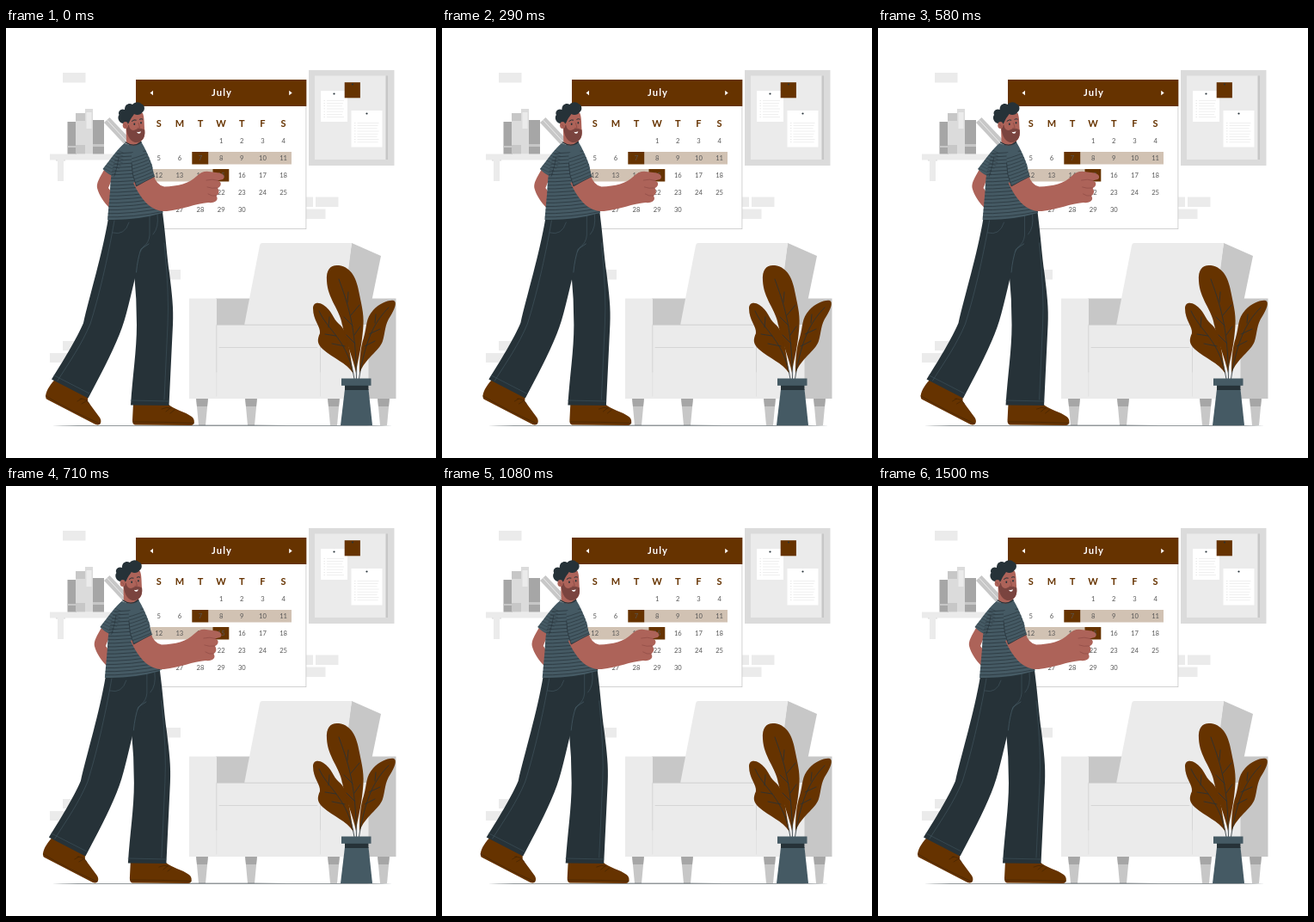
An HTML page with a canvas that plays this animation: 500 px wide and 500 px high, repeating every 1.54 s.

```html
<!DOCTYPE html>
<html lang="en">
<head>
<meta charset="utf-8">
<title>Planning the month</title>
<style>
  html, body { margin: 0; width: 100%; height: 100%; overflow: hidden; background: #fff; }
  canvas { display: block; width: 500px; height: 500px; }
</style>
</head>
<body>
<canvas id="stage" width="500" height="500"></canvas>
<script>
const ctx = document.getElementById('stage').getContext('2d');

const BROWN = '#663300', DEEP_BROWN = '#3f2305', TAN = '#d1c2b3';
const DARK = '#263238', SLATE = '#455a64';
const SKIN = '#ad6359', SKIN_SHADE = '#8f4b45', BEARD = '#7a443f';
const PALE = '#ebebeb', LIGHT = '#dbdbdb', MID = '#c7c7c7', GREY = '#a6a6a6';

const LOOP = 1540, FPS = 24, CYCLE = 1500, LEAD = 29;
const SHAKE = [0, -1, 2, -4, 4, -4, 4, -4, 2, -1, 0];

function box(color, x1, y1, x2, y2) {
  ctx.fillStyle = color;
  ctx.fillRect(x1, y1, x2 - x1, y2 - y1);
}

function shape(color, d) {
  ctx.fillStyle = color;
  ctx.fill(new Path2D(d));
}

function line(color, width, d) {
  ctx.strokeStyle = color;
  ctx.lineWidth = width;
  ctx.lineCap = ctx.lineJoin = 'round';
  ctx.stroke(new Path2D(d));
}

function dot(color, x, y, r, ry = r) {
  ctx.fillStyle = color;
  ctx.beginPath();
  ctx.ellipse(x, y, r, ry, 0, 0, Math.PI * 2);
  ctx.fill();
}

function clipped(d, draw) {
  ctx.save();
  ctx.clip(new Path2D(d));
  draw();
  ctx.restore();
}

function text(str, x, y, font, color) {
  ctx.font = font + ' Lato, sans-serif';
  ctx.fillStyle = color;
  ctx.textAlign = 'center';
  ctx.fillText(str, x, y);
}

function drawWall() {
  box(PALE, 66, 52, 92.5, 63.5);
  box(PALE, 340, 196.5, 357, 208);
  box(PALE, 360, 196.5, 386.5, 208);
  box(PALE, 340, 210.5, 371.5, 222);
  box(PALE, 176, 281, 203, 292.5);
  box(PALE, 66, 364, 92, 375);
  box(PALE, 51, 378, 77, 389);
}

function drawShelf() {
  box(LIGHT, 58, 153, 69, 154.5);
  box(PALE, 60, 153, 67, 178);
  box(PALE, 51, 146.5, 136, 153.5);
  box(GREY, 71.5, 109, 82, 146.5);
  box(MID, 81, 99, 92, 146.5);
  box(LIGHT, 81, 108, 92, 136);
  box(LIGHT, 92, 94, 101, 146.5);
  box(PALE, 93.5, 98, 99.5, 117);
  box(GREY, 101, 107, 114, 146.5);
  box(MID, 101, 135, 114, 138);
  box(MID, 71.5, 137, 82, 139);
  shape(MID, 'M114 110L120.5 104L150 135L143 141Z');
  line(PALE, 1, 'M118 107.5L146 138');
}

function drawSheet(x1, y1, x2, y2, top, rows) {
  box('#fff', x1, y1, x2, y2);
  for (let i = 0; i < rows; i++) {
    const y = top + i * 3.2;
    box(LIGHT, x1 + 3.5, y, x1 + 5, y + 0.6);
    box(PALE, x1 + 7, y, x2 - 4 - (i % 3), y + 0.8);
  }
  dot(DARK, (x1 + x2) / 2, y1 + 3.5, 1.1);
}

function drawBoard() {
  box(LIGHT, 352, 49, 451.5, 160);
  box(PALE, 359, 55.5, 442, 153);
  box(MID, 441.5, 55.5, 444, 153);
  drawSheet(366, 73, 397, 109, 84, 7);
  drawSheet(401.5, 96, 437.5, 138.5, 110, 8);
  box(BROWN, 393.7, 63.2, 411.9, 81.3);
  dot(DARK, 403, 65.5, 1);
}

function drawCalendar() {
  box(MID, 151, 60, 349.3, 234);
  box('#fff', 151.5, 91, 348.5, 233.2);
  box(BROWN, 151, 60, 349.3, 91);
  shape('#fff', 'M167.5 75.5L171 72.8V78.2ZM332.7 75.5L329.2 72.8V78.2Z');
  ctx.letterSpacing = '1.1px';
  text('July', 251, 78.6, 'bold 11.2px', '#fff');
  ctx.letterSpacing = '0px';

  box(TAN, 235, 144, 332, 158.5);
  box(TAN, 168, 164, 241, 178.5);
  box(BROWN, 216.3, 144, 235.2, 158.5);
  box(BROWN, 240.5, 164, 259.3, 178.5);

  const column = i => 177.7 + i * 24.15;
  [...'SMTWTFS'].forEach((day, i) => text(day, column(i), 114.6, 'bold 11px', BROWN));
  for (let day = 1; day <= 30; day++) {
    const cell = day + 2;
    text(day, column(cell % 7), 134.2 + Math.floor(cell / 7) * 19.9, '7.6px', '#565656');
  }
}

function drawChair() {
  for (const x of [228, 285, 381, 439]) {
    shape(MID, `M${x - 7} 430H${x + 7}L${x + 4} 462H${x - 4}Z`);
    shape(GREY, `M${x - 7} 430H${x + 7}L${x + 6} 440H${x - 6}Z`);
  }
  box(MID, 244, 314.5, 300, 346);
  shape(MID, 'M402 250L436 265L425.5 316V346H388Z');
  shape(PALE, 'M298 250H402L390 346H277L295 253Q295.6 250 298 250Z');
  box(PALE, 213, 314.5, 245, 431);
  box(PALE, 244.5, 345, 424, 431);
  box(MID, 421.5, 314.5, 453.5, 431);
  line(MID, 0.8, 'M245 345.2H365');
  line(MID, 0.6, 'M244.8 346V400M365.5 346V400M248 371.5H362');
  line(LIGHT, 0.6, 'M244.8 400V428M365.5 400V428');
}

function drawPlant() {
  line(PALE, 2.4, 'M403 392L405 409M407 390L407.5 409M412 394L410.5 409');
  shape(BROWN, 'M404 402C396 389 380 384 369 374C361 367 362 362 365 355C366 347 357 340 357 326' +
    'C357 319 363 318 369 322C379 328 380 338 387 344C398 352 399 375 404 402Z');
  shape(BROWN, 'M411 402C411 385 412 372 416 360C420 346 418 338 427 328C435 320 444 316 451 317' +
    'C455 319 452 327 447 335C440 345 441 355 438 364C434 376 417 384 411 402Z');
  shape(BROWN, 'M407 401C404 385 395 365 391 345C388 327 374 315 373 294C372 280 378 275 387 276' +
    'C402 278 408 292 411 310C414 325 417 335 415 352C413 375 409 385 407 401Z');
  line(DARK, 0.8, 'M387 292C397 320 407 345 407.5 408M397 319L398 307M401 334L411 322M403 346L393 336' +
    'M405 357L412 347M406 367L396 357');
  line(DARK, 0.8, 'M364 329C374 352 398 363 405 408M375 348L376 336M384 358L371 356M394 370L379 367');
  line(DARK, 0.8, 'M445 325C430 340 418 360 410.5 408M429 343L430 333M422 356L435 350M417 370L429 364');
  shape(SLATE, 'M394 420H421.5L426 462H389Z');
  box(DARK, 394, 415, 421.5, 421);
  box(SLATE, 390, 407.5, 424.5, 415.8);
}

function drawShoes() {
  shape(BROWN, 'M59 407C52 413 47 421 46 428Q46 431 48 432L104 461C110 463 112 458 109 453L95 434V428Z');
  line(DEEP_BROWN, 0.6, 'M46.5 428Q75 445 109 460');
  line(DEEP_BROWN, 0.6, 'M86 431Q94 431 97 437M83 434L88 431M88 437L93 434');
  shape(BROWN, 'M148 436L147 456Q147 461 150 461.5L215 462C220 462 220 455 216 452C208 446 196 444 188 437Z');
  line(DEEP_BROWN, 0.6, 'M147.5 458Q184 458 218.5 459.5');
  line(DEEP_BROWN, 0.6, 'M181 443Q187 440 192 442M186 446L191 442M191 448L196 444');
}

function drawTrousers() {
  shape(DARK, 'M150 240L182 214C186 245 187 265 190 285C193 310 195 325 194 345L189.5 439L145 438.5' +
    'C147 405 152 375 152 345Q152 315 149 284Z');
  shape(DARK, 'M119 221L182 214L165 258Q155 266 152 283C145 310 140 337 132 356C122 381 109 405 95.5 430.5' +
    'L53 408.5C66 388 83 360 90 343C97 312 112 263 119 221Z');
  line(SLATE, 0.6, 'M126 224C118 270 108 312 98 344C88 368 74 388 60 410');
  line(SLATE, 0.6, 'M124 238Q138 242 143 226M167 218V241Q166 250 160 254L156 260M176 217Q178 232 171 240');
  line(SLATE, 0.8, 'M166 251L157 257Q153 268 151.5 284');
  line(SLATE, 0.5, 'M56 404L97 425M145 433L189.5 434M184 250Q190 310 188 345L184 432');
}

function drawShirt() {
  const back = 'M138 134C131 139 121 153 112.5 164Q118 170 126 173L140 150Z';
  const body = 'M138 134Q148 139 157 132C162 140 166 149 170 160L174 184Q181 199 182.5 215' +
    'Q151 224 118 223L121 190C122 166 126 144 138 134Z';
  shape(SKIN, 'M114 165C109 174 105 180 106 186C108 194 114 203 120 209L122 190L119 186L125 171Z');
  shape(SLATE, back);
  shape(SLATE, body);
  clipped(body, () => {
    for (let y = 146; y < 226; y += 4.1) line(DARK, 0.7, `M112 ${y}Q148 ${y + 1} 186 ${y - 7}`);
  });
  clipped(back, () => {
    for (let y = 132; y < 172; y += 4.1) line(DARK, 0.4, `M108 ${y}L136 ${y + 13}`);
  });
  line(DARK, 0.6, 'M126 172Q130 160 131 151');
}

function drawHead() {
  shape(SKIN, 'M139.5 114L140 133Q149 141 157 132V120Z');
  shape(SKIN_SHADE, 'M142 125Q148 135 157 132V128Z');
  line(DARK, 1.4, 'M139 133Q149 139.5 157 132.5');
  shape(SKIN, 'M139 106C142 97 157 96 159 99C161 104 160.5 110 161.3 120C162 129 157 133.5 150 133' +
    'C143 131 140 121 139 106Z');
  shape(BEARD, 'M139.5 113L143 113C143.6 118 147 120.5 151 118Q156 115.5 161.2 118.5' +
    'C162.4 129 157 133.5 150 133C143 131 140 123 139.5 113Z');
  shape(DARK, 'M136 111C131 110 129 104 131.5 101C129.5 97 134 93 138 95C138 88 144 87 147 89' +
    'C150 85 156 86 157 88C162 89 162 96 158.5 98C157 101 152 102 149 100C147 103 145 105 143 110L140 114Z');
  dot(SKIN, 138.8, 113, 3.1, 4);
  line(SKIN_SHADE, 0.7, 'M137.5 112Q140 112 139.8 115');
  dot(DARK, 149.3, 111.8, 0.9, 1.3);
  dot(DARK, 157, 110.3, 0.8, 1.2);
  line(DARK, 1, 'M146.5 108.3Q149 106 151.3 107M155.4 106.2Q157 105 158.8 106');
  line(SKIN_SHADE, 0.8, 'M154 110.5L155.6 116L153 116.3');
  shape('#fff', 'M152 120.8Q154.5 121.5 157 120.3Q156.5 122.8 154.5 122.8Q152.8 122.6 152 120.8Z');
}

function drawArm() {
  shape(SKIN, 'M148 180L171 170Q175 183 184 184.5C200 184 213 181 222 172Q228 166 236 167L248 168.5' +
    'C254 170 255 174 252 176L246 177.5C252 179 250 185 246 186C249 190 247 194 244.5 195' +
    'C248 200 243 204 235 203C221 204 205 211 187 213C168 214 157 199 148 180Z');
  line(SKIN_SHADE, 0.7, 'M247 177.5Q240 175 233 177M246 186Q239 187 234 185M244.5 195Q239 196 235 193');
  const sleeve = 'M146 146C152 139 160 141 163.5 148Q169 160 173 172.5Q162 178 151.5 184Q145 168 146 146Z';
  shape(SLATE, sleeve);
  clipped(sleeve, () => {
    for (let y = 149; y < 200; y += 4.1) line(DARK, 0.6, `M142 ${y + 4}Q160 ${y} 178 ${y - 10}`);
  });
  line(DARK, 0.7, 'M146 157Q146 170 151.5 184Q162 178 173 172.5');
}

function drawMan() {
  drawShoes();
  drawTrousers();
  drawShirt();
  drawHead();
  drawArm();
}

function shakeOffset(time) {
  const pos = (time + LEAD) % CYCLE / CYCLE * 10;
  const i = Math.floor(pos);
  return SHAKE[i] + (SHAKE[i + 1] - SHAKE[i]) * (pos - i);
}

function render(now) {
  const step = Math.floor((now % LOOP + 5) * FPS / 1000) % 37;
  box('#fff', 0, 0, 500, 500);
  drawWall();
  drawShelf();
  drawBoard();
  drawCalendar();
  drawChair();
  dot(DARK, 251.5, 462.2, 202, 0.35);
  drawPlant();
  ctx.save();
  ctx.translate(shakeOffset(step * 1000 / FPS) + 0.2, 0);
  drawMan();
  ctx.restore();
  requestAnimationFrame(tick);
}

let start;
function tick(now) {
  start ??= now;
  render(now - start);
}
render(0);
</script>
</body>
</html>
```
